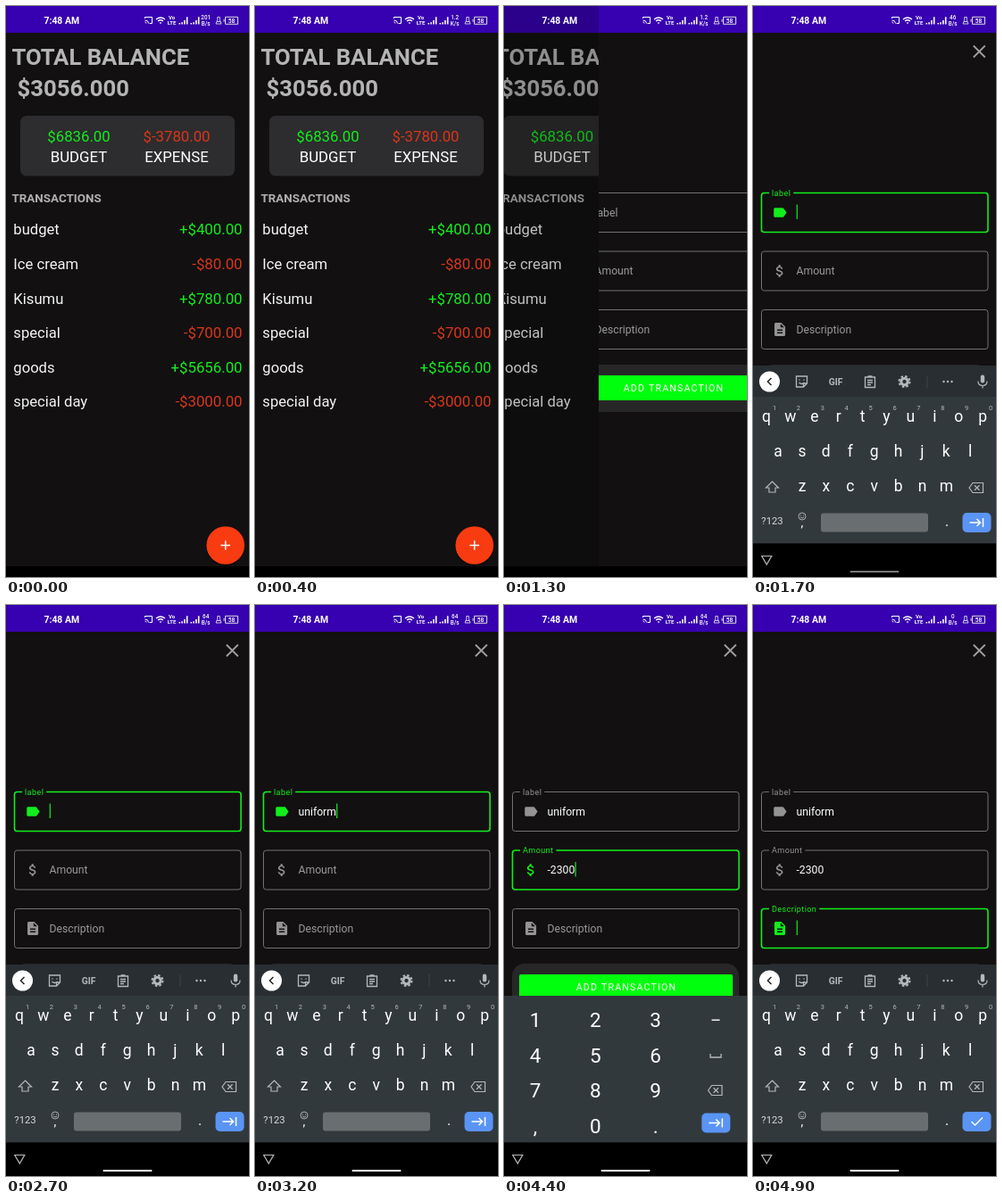
An HTML page with a canvas for the animation above (5000 ms loop, 272 px wide and 640 px high).

```html
<!DOCTYPE html>
<html lang="en">
<head>
<meta charset="utf-8">
<title>Budget app</title>
<style>
html, body { margin: 0; width: 100%; height: 100%; overflow: hidden; background: #000; }
canvas { display: block; width: 272px; height: 640px; }
</style>
</head>
<body>
<canvas id="stage"></canvas>
<script>
const W = 272, H = 640, LOOP = 5000, STEP = 100;
const GREEN = '#12ee1c', RED = '#d8371a', GRAY = '#949494', KEY = '#b4b8ba';
const canvas = document.getElementById('stage');
const ratio = window.devicePixelRatio || 1;
canvas.width = W * ratio;
canvas.height = H * ratio;
const c = canvas.getContext('2d');

const icons = {
  label: new Path2D('M17.63 5.84C17.27 5.33 16.67 5 16 5L5 5.01C3.9 5.01 3 5.9 3 7v10c0 1.1.9 1.99 2 1.99L16 19c.67 0 1.27-.33 1.63-.84L22 12z'),
  money: new Path2D('M11.8 10.9c-2.27-.59-3-1.2-3-2.15 0-1.09 1.01-1.85 2.7-1.85 1.78 0 2.44.85 2.5 2.1h2.21c-.07-1.72-1.12-3.3-3.21-3.81V3h-3v2.16c-1.94.42-3.5 1.68-3.5 3.61 0 2.31 1.91 3.46 4.7 4.13 2.5.6 3 1.48 3 2.41 0 .69-.49 1.79-2.7 1.79-2.06 0-2.87-.92-2.98-2.1h-2.2c.12 2.19 1.76 3.42 3.68 3.83V21h3v-2.15c1.95-.37 3.5-1.5 3.5-3.55 0-2.84-2.43-3.81-4.7-4.4z'),
  note: new Path2D('M14 2H6c-1.1 0-2 .9-2 2v16c0 1.1.9 2 2 2h12c1.1 0 2-.9 2-2V8zm2 16H8v-2h8zm0-4H8v-2h8zm-3-5V3.5L18.5 9z')
};

function rect(x, y, w, h, color, r = 0) {
  c.fillStyle = color;
  c.beginPath();
  c.roundRect(x, y, w, h, r);
  c.fill();
}

function disc(x, y, r, color) {
  c.fillStyle = color;
  c.beginPath();
  c.arc(x, y, r, 0, 7);
  c.fill();
}

function stroke(path, color, width = 1.2, x = 0, y = 0) {
  c.save();
  c.translate(x, y);
  c.strokeStyle = color;
  c.lineWidth = width;
  c.stroke(new Path2D(path));
  c.restore();
}

function text(str, x, y, size, color, { align = 'left', weight = 400, spacing = 0 } = {}) {
  c.font = `${weight} ${size}px Roboto, sans-serif`;
  c.letterSpacing = spacing + 'px';
  c.textAlign = align;
  c.fillStyle = color;
  c.fillText(str, x, y);
  return c.measureText(str).width;
}
const center = (str, x, y, size, color, weight) => text(str, x, y, size, color, { align: 'center', weight });

function page() {
  rect(0, 0, W, 628, '#121011');
  rect(0, 0, W, 30, '#3700b0');
  rect(0, 628, W, 12, '#000');
}

function homePage() {
  page();
  text('TOTAL BALANCE', 6.5, 65.5, 25.7, '#b4b4b4', { weight: 700 });
  text('$3056.000', 12.5, 101, 25.7, '#b4b4b4', { weight: 700 });
  rect(16, 123, 240, 67.5, '#2d2c2e', 7);
  center('$6836.00', 81.5, 152, 16.8, GREEN);
  center('BUDGET', 81.5, 175.3, 16.8, '#fff');
  center('$-3780.00', 191, 152, 16.8, RED);
  center('EXPENSE', 191, 175.3, 16.8, '#fff');
  text('TRANSACTIONS', 6.5, 219.7, 13.4, '#b0b0b0', { weight: 700 });
  [['budget', '+$400.00'], ['Ice cream', '-$80.00'], ['Kisumu', '+$780.00'],
   ['special', '-$700.00'], ['goods', '+$5656.00'], ['special day', '-$3000.00']]
    .forEach(([name, amount], i) => {
      const y = 256.3 + i * 38.6;
      text(name, 8.3, y, 16.65, '#f4f4f4');
      text(amount, 264.5, y, 16.8, amount[0] === '+' ? GREEN : RED, { align: 'right' });
    });
  disc(245.7, 605.5, 22, '#0008');
  disc(245.7, 604.5, 21.3, '#f83b10');
  stroke('M-5.3 0H5.3M0-5.3V5.3', '#fff', 1.5, 245.7, 604.5);
}

function field(y, hint, icon, value, focused) {
  const color = focused ? GREEN : GRAY;
  c.lineWidth = focused ? 1.6 : 1;
  c.strokeStyle = focused ? GREEN : '#737273';
  c.beginPath();
  c.roundRect(9.5, y, 253.5, 44, 3);
  c.stroke();
  if (focused || value) {
    c.font = '400 9.07px Roboto, sans-serif';
    c.letterSpacing = '0.4px';
    rect(18, y - 2, c.measureText(hint).width + 6, 4, '#121011');
    text(hint, 21, y + 3.3, 9.07, color, { spacing: 0.4 });
  } else {
    text(hint, 48.5, y + 26.3, 12.2, '#9a9a9a');
  }
  c.save();
  c.translate(21, y + 13);
  c.scale(0.7556, 0.7556);
  c.fillStyle = color;
  c.fill(icons[icon], 'evenodd');
  c.restore();
  const width = value ? text(value, 48.5, y + 26.3, 12.2, '#fff') : 0;
  if (focused) rect(48.7 + width, y + 13, 1.2, 16.5, GREEN);
}

function formPage(label, amount, focus) {
  page();
  stroke('M-6.5-6.5L6.5 6.5M6.5-6.5L-6.5 6.5', '#a0a0a0', 1.8, 253.3, 51);
  field(209.5, 'label', 'label', label, focus === 0);
  field(275, 'Amount', 'money', amount, focus === 1);
  field(340.5, 'Description', 'note', '', focus === 2);
  rect(9, 402, 254, 53, '#282728', 14);
  rect(17, 414, 239, 28, '#00ff0c', 2);
  text('ADD TRANSACTION', 137, 432, 10.58, '#fff', { align: 'center', spacing: 1.2 });
}

function backspace(x, y) {
  stroke('M-8 0L-4-5.5H7.5V5.5H-4ZM-2-2.7L3.5 2.7M3.5-2.7L-2 2.7', KEY, 1.2, x, y);
}

function actionKey(x, y, done) {
  rect(x - 16, y - 11, 32, 22, '#5a94f4', 5);
  stroke(done ? 'M-6 0L-2 4L6.5-4.5' : 'M-8 0H4M0-4L4 0L0 4M7-5V5', '#fff', 1.5, x, y);
}

function toolbar() {
  rect(0, 403, W, 35, '#292e32');
  disc(18.5, 421, 11.5, '#fff');
  stroke('M2-4L-2 0L2 4', '#222', 1.5, 18.5, 421);
  stroke('M-6-6H6V2L2 6H-6ZM6 2H2V6M-3-2H-2M2-2H3M-3 1Q0 4 3 1', KEY, 1.3, 54.5, 421);
  center('GIF', 92.5, 424.7, 10.3, KEY, 700);
  stroke('M-5.5-5H5.5V6.5H-5.5ZM-2.5-6H2.5M-3-1.5H3M-3 1H3M-3 3.5H1', KEY, 1.3, 131, 421);
  c.setLineDash([2.5, 2.21]);
  stroke('M6 0A6 6 0 1 1-6 0A6 6 0 1 1 6 0', KEY, 2, 169.5, 421);
  c.setLineDash([]);
  stroke('M3.7 0A3.7 3.7 0 1 1-3.7 0A3.7 3.7 0 1 1 3.7 0', KEY, 3, 169.5, 421);
  rect(194.5, 414, 1, 14, '#3c4246');
  for (const x of [213.5, 218, 222.5]) disc(x, 421, 1.2, KEY);
  rect(254.8, 413.5, 4.4, 9, KEY, 2.2);
  stroke('M-5 0Q-5 5 0 5Q5 5 5 0M0 5V8', KEY, 1.2, 257, 420.5);
}

function letterKeys(done) {
  toolbar();
  rect(0, 438, W, 164.5, '#32393d');
  [['qwertyuiop', 15, 465.5], ['asdfghjkl', 28, 504.5], ['zxcvbnm', 55, 543.5]]
    .forEach(([row, x, y], r) => [...row].forEach((key, i) => {
      center(key, x + i * 26.9, y, 17.5, '#fff');
      if (!r) center((i + 1) % 10, x + 9 + i * 26.9, 453, 7.5, KEY);
    }));
  stroke('M0-6L7 1H3.5V6H-3.5V1H-7Z', KEY, 1.2, 21.5, 539);
  backspace(250, 540);
  center('?123', 21.5, 581, 11.3, '#d8dadb');
  stroke('M4 0A4 4 0 1 1-4 0A4 4 0 1 1 4 0M-2-1H-1M1-1H2M-2 1Q0 3 2 1', KEY, 0.9, 55, 572);
  center(',', 55, 584, 14, '#fff');
  rect(76, 568.5, 120, 21, '#696e71', 3);
  center('.', 217, 583, 16, '#fff');
  actionKey(250.5, 579, done);
}

function numberKeys() {
  rect(0, 438, W, 164.5, '#32393d');
  ['123', '456', '789', ',0.'].forEach((row, r) => [...row].forEach((key, i) =>
    center(key, 35 + i * 67.3, 473 + r * 39.6, 22.5, '#fff')));
  rect(232.5, 464.5, 9, 1.4, '#fff');
  stroke('M-6-2V2H6V-2', KEY, 1.3, 237, 505);
  backspace(236.5, 544);
  actionKey(237.3, 580.5, false);
}

function keyboard(t) {
  if (t >= 3400 && t < 4600) numberKeys();
  else letterKeys(t >= 4600);
  rect(0, 602.5, W, 37.5, '#000');
  stroke('M-5.5-4.5H5.5L0 5Z', '#b8b8b8', 1.2, 15.3, 621);
  rect(108.5, 633, 55, 2, t < 1800 ? '#777' : '#fff', 1);
}

function statusBar(t) {
  text('7:48 AM', 42.5, 20.3, 10.4, '#fff', { weight: 700 });
  stroke('M-4-2V-3.5H4V3.5H1M-4 0Q0 0 0 3.5M-4 2Q-2.5 2-2.5 3.5', '#fff', 1, 159.5, 16);
  stroke('M-5-2Q0-6 5-2M-3 0Q0-2.5 3 0M-1 2.2Q0 1.4 1 2.2', '#fff', 1.3, 173, 17);
  center('Vo', 185.5, 15, 6, '#fff', 700);
  center('LTE', 185.5, 21, 6, '#fff', 700);
  for (const x of [193.5, 206.5])
    for (let i = 0; i < 4; i++) {
      const height = 1.5 + i * i * 0.75;
      rect(x + i * 2.8, 20.5 - height, 1.6, height, '#fff');
    }
  const [speed, unit] = t < 400 ? ['201', 'B/s'] : t < 1700 ? ['1.2', 'K/s']
    : t < 2200 ? ['46', 'B/s'] : t < 4600 ? ['64', 'B/s'] : ['0', 'B/s'];
  center(speed, 223.7, 14.7, 6.3, '#fff', 500);
  center(unit, 223.7, 21.7, 6.3, '#fff', 500);
  stroke('M-1.3-4H1.3V-1L3 3.5H-3L-1.3-1ZM-2 1H2', '#ddd', 0.9, 238, 16.5);
  stroke('M-7-4H7V4H-7ZM-8.5-1.5V1.5', '#ddd', 1, 252.5, 16.3);
  center('58', 252.5, 18.8, 6.6, '#fff', 500);
}

function typed(word, t, start) {
  return word.slice(0, Math.max(0, Math.floor((t - start) / STEP) + 1));
}

function draw(t) {
  c.setTransform(ratio, 0, 0, ratio, 0, 0);
  const u = Math.min(1, Math.max(0, (t - 1200) / 300));
  const slide = 1 - (1 - u) ** 2.32;
  if (slide < 1) {
    c.save();
    c.translate(-0.1 * W * slide, 0);
    homePage();
    c.restore();
    rect(0, 0, W, H, `rgba(0,0,0,${0.35 * slide})`);
  }
  if (slide > 0) {
    const edge = Math.round(W * (1 - slide));
    const label = t < 3200 ? typed('unifo', t, 2800) : 'uniform';
    const focus = t < 1700 ? -1 : t < 3400 ? 0 : t < 4600 ? 1 : 2;
    c.save();
    c.beginPath();
    c.rect(edge, 0, W - edge, H);
    c.clip();
    c.translate(edge / 2, 0);
    formPage(label, typed('-2300', t, 3700), focus);
    c.restore();
  }
  if (t >= 1700) keyboard(t);
  statusBar(t);
}

const begin = performance.now();
function tick() {
  const t = (performance.now() - begin) % LOOP;
  draw(Math.floor(t / STEP) * STEP);
  requestAnimationFrame(tick);
}
tick();
</script>
</body>
</html>
```
